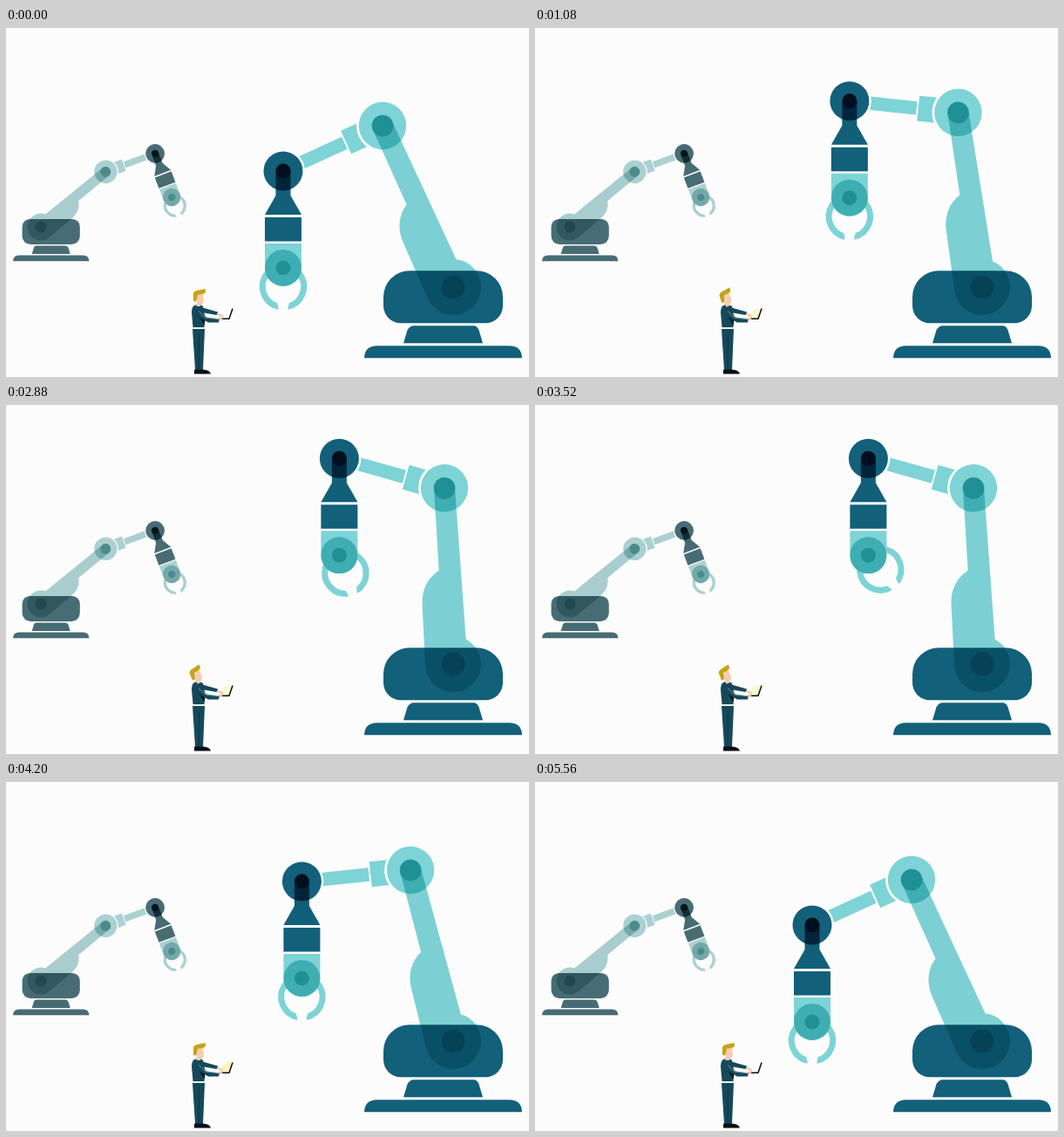
Recreate the animation shown at these times as an HTML page with a canvas. Size 600x400 px, loop 10 s.

```html
<!DOCTYPE html>
<html lang="en">
<head>
<meta charset="utf-8">
<title>Robot arms</title>
<style>
  html, body { margin: 0; width: 100%; height: 100%; overflow: hidden; background: #fcfcfc; }
  canvas { display: block; width: 600px; height: 400px; }
</style>
</head>
<body>
<canvas id="stage" width="600" height="400"></canvas>
<script>
const ctx = document.getElementById('stage').getContext('2d');
const LOOP = 10000;
const PAPER = '#fcfcfc';
const UPPER = 202;
const FOREARM = 125.3;
const rad = degrees => degrees * Math.PI / 180;

// Eased value at time t from [time, value] pairs.
function track(t, keys) {
  if (t <= keys[0][0]) return keys[0][1];
  for (let i = 1; i < keys.length; i++) {
    const [t0, v0] = keys[i - 1], [t1, v1] = keys[i];
    if (t < t1) {
      const u = (t - t0) / (t1 - t0);
      return v0 + (v1 - v0) * u * u * (3 - 2 * u);
    }
  }
  return keys[keys.length - 1][1];
}

const lift = t => track(t, [[400, 0], [1400, 1], [3560, 1], [4780, 0]]);
const clawTurn = t => track(t, [[1440, 0], [1800, 38], [2500, 0], [3400, -50], [3840, 0]]);
const headTilt = t => track(t, [[400, 0], [1400, -22], [3480, -22], [3900, 0]]);
const glow = t => track(t, [[120, 0], [240, .4], [3960, .4], [4480, .8], [5560, 0]]);

function fill(d, color, blend = 'source-over') {
  ctx.globalCompositeOperation = blend;
  ctx.fillStyle = color;
  ctx.fill(new Path2D(d));
  ctx.globalCompositeOperation = 'source-over';
}

function line(d, color, width) {
  ctx.strokeStyle = color;
  ctx.lineWidth = width;
  ctx.stroke(new Path2D(d));
}

const disc = (r, y = 0) => `M${-r} ${y}a${r} ${r} 0 1 1 ${2 * r} 0a${r} ${r} 0 1 1 ${-2 * r} 0Z`;

function at(x, y, degrees, draw) {
  ctx.save();
  ctx.translate(x, y);
  ctx.rotate(rad(degrees));
  draw();
  ctx.restore();
}

function drawBase(dark, corner) {
  const body = new Path2D();
  body.roundRect(-68.5, 0, 137, 60, [corner, corner, 20, 20]);
  ctx.fillStyle = dark;
  ctx.fill(body);
  fill('M-34 63H35Q39 63 41 68L45.5 83H-45.5L-41 68Q-38 63 -34 63Z', dark);
  fill('M-90.5 100Q-90 86 -76 86H76Q90 86 90.5 100Z', dark);
}

function drawTool(dark, light, claw) {
  at(0, 111, claw, () => {
    line('M-5 44.5A23.7 23.7 0 1 1 5 44.5', light, 7);
    fill('M-7.5 38H7.5L4 50H-4Z', PAPER);
  });
  fill(disc(25), PAPER);
  fill(disc(22.5), dark);
  fill('M-8.5 0A8.5 8.5 0 0 1 8.5 0V28L21 50H-21L-8.5 28Z', dark, 'multiply');
  fill(disc(8.5), dark, 'multiply');
  fill('M-21 53H21V80.5H-21Z', dark);
  fill('M-21 83H21V111A21 21 0 0 1 -21 111Z', light);
  fill(disc(21, 111), light, 'multiply');
  fill(disc(8.5, 111), light, 'multiply');
}

function drawRobot({ x, y, scale, flip, corner, pivot, dark, light, lean, reach, tool, claw }) {
  ctx.save();
  ctx.translate(x, y);
  ctx.scale(scale * flip, scale);
  drawBase(dark, corner);
  ctx.translate(pivot, 18.7);

  const shoulderX = UPPER * Math.sin(rad(lean));
  const shoulderY = -UPPER * Math.cos(rad(lean));
  at(shoulderX, shoulderY, reach, () => {
    fill('M-102 -7.7H-48V7.7H-102Z', light);
    fill('M-46 -14.5H-20V14.5H-46Z', light);
    fill(disc(30), PAPER);
    at(-FOREARM, 0, tool - reach, () => drawTool(dark, light, claw));
    fill(disc(27.2), light);
  });

  at(0, 0, lean, () => {
    fill('M-12 -202L-11 -108C-24 -101 -32 -87 -32 -70V0A32 32 0 1 0 16 -27.7L12 -202A12 12 0 0 0 -12 -202Z',
      light, 'multiply');
    fill(disc(13.5), light, 'multiply');
    fill(disc(12.5, -UPPER), light, 'multiply');
  });
  ctx.restore();
}

function drawPerson(t) {
  const suit = '#15495a', ink = '#0b0d14', skin = '#f6cdb2';
  // legs, shoes
  fill('M214 345H228L226 392H217Z', suit);
  fill('M216 391.5H226Q234 392 235 396.5H216Z', ink);
  line('M221.5 352L221 391', '#0c303f', .8);
  // laptop and its light
  ctx.globalAlpha = glow(t);
  fill('M245 331L250 323L259.5 320L256 333Z', '#f8f38c');
  ctx.globalAlpha = 1;
  line('M245 333.2H256L260 321.5', ink, 1.5);
  // torso, arms
  fill('M216 318Q222 315.5 226 319L228.5 332L227.5 343H214.5L213 326Q213 320 216 318Z', suit);
  fill('M220 329L228.5 334L227.5 340Z', ink);
  line('M214.5 344H228', '#d5e5e8', 1);
  line('M241 326.5L249 331', skin, 2.6);
  line('M242 335.5L248 333', skin, 2.6);
  fill('M222 319.5L243 325.5L241.5 329L222 325.5Z', suit);
  fill('M218 323Q221 321 224 326L230 331.5L244.5 333.5L244 337.5L232 337.5L219 330Z', suit);
  line('M221 324.5L229 332L244 333.8', '#d5e5e8', .5);
  // head
  at(221, 317, headTilt(t), () => {
    fill('M-3.5 -12H5.5V-8L6.5 -5L5.5 -4.5Q5.5 0 2 0V2H-2.5V-3Z', skin);
    fill('M-6 -4V-13Q-5 -16 0 -16.5L7.5 -18Q9 -14 6 -12.5Q3 -11.5 -1 -11.5L-2 -6.5L-3.5 -3.5Z', '#c4a414');
  });
}

function draw(t) {
  const raise = lift(t);
  ctx.fillStyle = PAPER;
  ctx.fillRect(0, 0, 600, 400);
  drawRobot({
    x: 51.7, y: 219, scale: .483, flip: -1, corner: 18, pivot: 24.2,
    dark: '#486c74', light: '#abd0d1',
    lean: -49.6, reach: 20.2, tool: 20.8, claw: 0
  });
  drawRobot({
    x: 501.5, y: 278.3, scale: 1, flip: 1, corner: 30, pivot: 11.5,
    dark: '#12607a', light: '#7dd3d6',
    lean: -23.64 + 20.8 * raise, reach: -24.5 + 40.2 * raise, tool: 0, claw: clawTurn(t)
  });
  drawPerson(t);
}

const start = performance.now();
function tick() {
  draw((performance.now() - start) % LOOP);
  requestAnimationFrame(tick);
}
tick();
</script>
</body>
</html>
```
